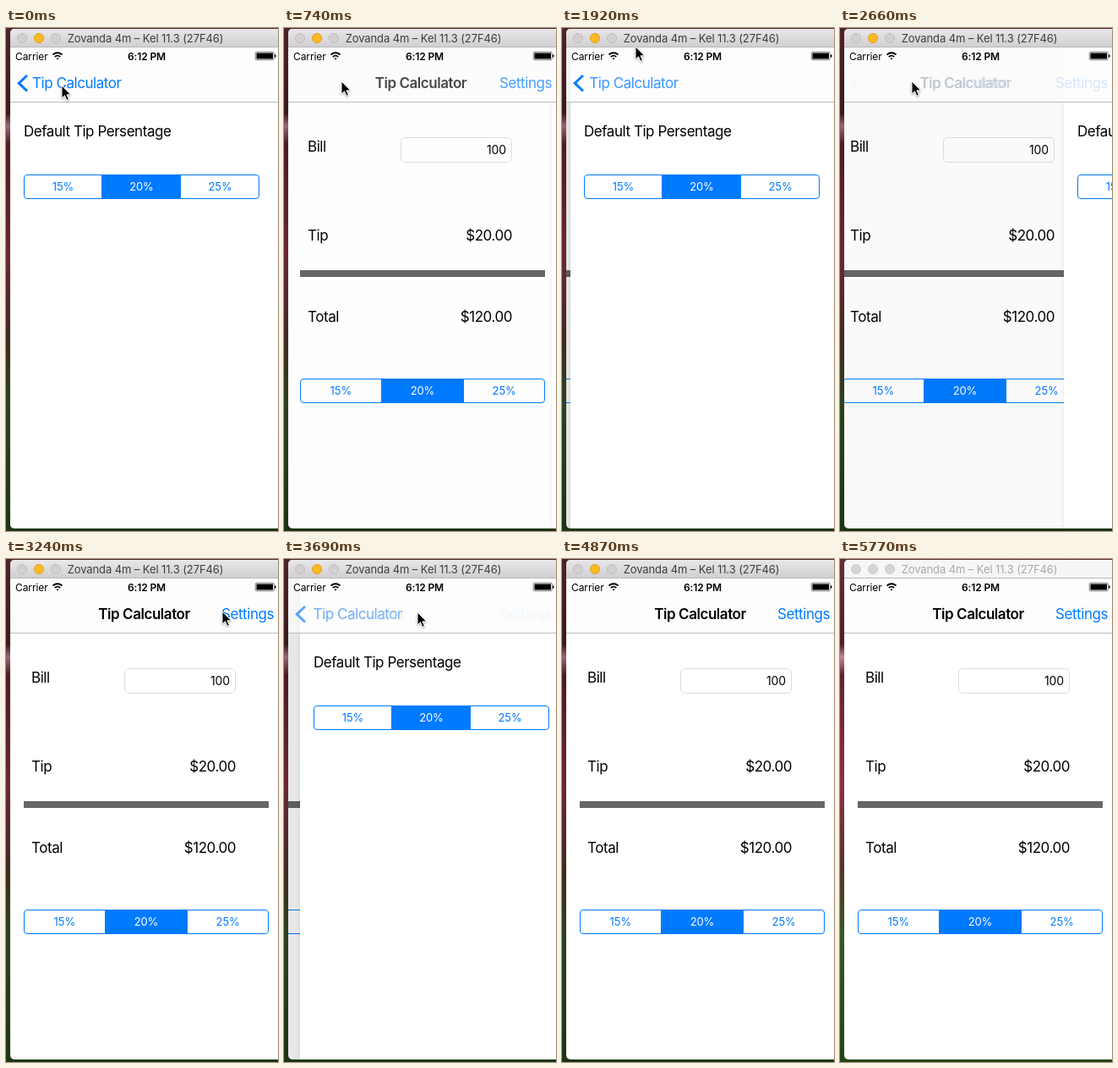
Write an HTML page that moves like this. It is 322x594 px and loops after 5870 ms.

```html
<!DOCTYPE html>
<html lang="en">
<head>
<meta charset="utf-8">
<title>Tip Calculator</title>
<style>
  html, body { margin: 0; width: 100%; height: 100%; overflow: hidden; }
  svg { display: block; width: 100vw; height: 100vh; }
  text { font: 17px Inter, "Liberation Sans", sans-serif; letter-spacing: -.45px; white-space: pre; }
  .small { font-size: 13px; letter-spacing: -.1px; }
  .field { font-size: 14px; letter-spacing: -.1px; }
  .status { font-size: 12px; letter-spacing: -.1px; }
  .bold { font-weight: 600; }
  .mid { text-anchor: middle; }
  .end { text-anchor: end; }
  .blue { fill: #007aff; }
  .sheet { filter: drop-shadow(-1px 0 2px rgba(0, 0, 0, .06)); }
  #cursor { filter: drop-shadow(0 1px 1px rgba(0, 0, 0, .35)); }
  #lights circle { fill: #d2d0d2; stroke: #bdbbbd; }
  #lights .amber { fill: #fdb924; stroke: #e09e1a; }
  #caption { fill: #3e3c3e; }
  #bar { fill: url(#chrome); }
  .idle #bar { fill: #f6f6f6; }
  .idle #caption { fill: #a9a9a9; }
  .idle #lights circle { fill: #d5d5d5; stroke: #c8c8c8; }
  .idle #shade { opacity: .05; }
</style>
</head>
<body>
<svg id="stage" viewBox="0 0 322 594" preserveAspectRatio="none">
  <defs>
    <linearGradient id="wall" x2="0" y2="1">
      <stop offset="0" stop-color="#6a303a"/>
      <stop offset=".17" stop-color="#54222a"/>
      <stop offset=".195" stop-color="#d08ca4"/>
      <stop offset=".23" stop-color="#6c2432"/>
      <stop offset=".45" stop-color="#94344a"/>
      <stop offset=".62" stop-color="#5a3a2c"/>
      <stop offset=".75" stop-color="#3c5c28"/>
      <stop offset="1" stop-color="#264818"/>
    </linearGradient>
    <linearGradient id="chrome" x2="0" y2="1">
      <stop offset="0" stop-color="#e9e7e9"/>
      <stop offset="1" stop-color="#d1cfd1"/>
    </linearGradient>
    <clipPath id="frame"><rect x="5" y="1" width="330" height="590" rx="5"/></clipPath>
  </defs>

  <rect width="322" height="594" fill="url(#wall)"/>
  <rect id="shade" width="322" height="594" opacity=".27"/>

  <g clip-path="url(#frame)">
    <rect x="5" y="1" width="320" height="590" fill="#fff"/>

    <g id="home">
      <text x="30" y="146">Bill</text>
      <rect x="140.5" y="129.5" width="131" height="29" rx="4.5" fill="#fff" stroke="#dedede"/>
      <text class="field end" x="265" y="149">100</text>
      <text x="30" y="251">Tip</text>
      <text class="end" x="272" y="251">$20.00</text>
      <rect x="21" y="286" width="290" height="8" fill="#666"/>
      <text x="30" y="347">Total</text>
      <text class="end" x="272" y="347">$120.00</text>
      <g class="segments" data-y="414" data-width="290"></g>
    </g>
    <rect id="dim" x="5" y="23" width="320" height="568"/>

    <g id="settings">
      <rect class="sheet" x="5" y="23" width="322" height="568" fill="#fff"/>
      <text x="21" y="128">Default Tip Persentage</text>
      <g class="segments" data-y="173" data-width="279"></g>
    </g>

    <rect x="5" y="23" width="320" height="64" fill="#fdfdfd" opacity=".7"/>
    <rect x="5" y="87" width="320" height="1" fill="#bcbcbc"/>
    <path id="chevron" d="M25 56 15.200 65.200 25 74.500" fill="none" stroke="#007aff" stroke-width="3"/>
    <text id="backLabel" class="blue" y="71">Tip Calculator</text>
    <g id="front">
      <text id="title" class="bold" y="71">Tip Calculator</text>
      <text class="blue end" x="317" y="71">Settings</text>
    </g>

    <text class="status" x="11" y="37.500">Carrier</text>
    <g fill="none" stroke="#000" stroke-width="1.700">
      <path d="M55.500 31.500q5.500-4.500 11 0M57.700 34q3.300-2.700 6.600 0"/>
      <path d="M59.300 35.500h3.400L61 37.500z" fill="#000" stroke="none"/>
    </g>
    <text class="status bold mid" x="166.500" y="37.500">6:12 PM</text>
    <rect x="295.250" y="28.250" width="22" height="9.500" rx="1.500" fill="none" stroke="#000" stroke-width=".5"/>
    <path d="M296.500 29.500h19.500v7h-19.500zM318 31.500h1.500v3H318z"/>

    <rect id="bar" x="5" y="1" width="320" height="21"/>
    <rect x="5" y="22" width="320" height="1" fill="#bab8ba"/>
    <g id="lights">
      <circle cx="19" cy="12" r="5.500"/>
      <circle class="amber" cx="39" cy="12" r="5.500"/>
      <circle cx="59" cy="12" r="5.500"/>
    </g>
    <text id="caption" class="small mid" x="165" y="16.500">Zovanda 4m – Kel 11.3 (27F46)</text>
  </g>

  <path id="cursor" d="M0 0v15l3.500-3.300 2.400 5.600 2.500-1.100-2.400-5.400h4.800z" stroke="#fff"/>
</svg>
<script>
const LOOP = 5870, STEP = 147.5;
const CURSOR_GONE = 4720, IDLE_FROM = 5770;
const SLIDES = [
  { start: -2000, opens: true },
  { start: 415, opens: false },
  { start: 1577, opens: true },
  { start: 2484, opens: false },
  { start: 3416, opens: true },
  { start: 4268, opens: false },
];
const BACK = [68, 63], SETTINGS = [286, 62];
const TRIPS = [
  { start: 0, end: 147, from: [66, 68], to: BACK },
  { start: 740, end: 1340, from: BACK, to: SETTINGS },
  { start: 1590, end: 1910, from: SETTINGS, to: [87, 22] },
  { start: 1920, end: 2500, from: [87, 22], to: [85, 63] },
  { start: 2660, end: 3240, from: [85, 63], to: SETTINGS },
  { start: 3420, end: 3900, from: SETTINGS, to: BACK },
];

const $ = id => document.getElementById(id);
const lerp = (a, b, k) => a + (b - a) * k;
const clamp = v => Math.min(1, Math.max(0, v));
const smooth = k => k * k * (3 - 2 * k);
const current = (list, t) => list.filter(item => item.start <= t).pop();
const set = (id, name, value) => $(id).setAttribute(name, value);
const shift = (id, x, y = 0) => set(id, 'transform', `translate(${Math.round(x)} ${Math.round(y)})`);

for (const group of document.querySelectorAll('.segments')) {
  const x = 21, y = +group.dataset.y, width = +group.dataset.width;
  const part = width / 3, first = Math.round(x + part);
  group.innerHTML =
    `<rect x="${x + .5}" y="${y + .5}" width="${width - 1}" height="28" rx="3.5" fill="#fff" stroke="#007aff"/>` +
    `<rect class="blue" x="${first - 1}" y="${y}" width="${Math.round(part) + 1}" height="29"/>` +
    ['15%', '20%', '25%'].map((label, i) =>
      `<text class="small mid" x="${x + part * (i + .5)}" y="${y + 19}" fill="${i === 1 ? '#fff' : '#007aff'}">${label}</text>`
    ).join('');
}

function drawScreens(t) {
  const { start, opens } = current(SLIDES, t);
  const age = (t - start) / 1000;
  const spring = 18 * age;
  const left = age > .46 ? 0 : (1 + spring) * Math.exp(-spring);
  const open = opens ? 1 - left : left;

  shift('home', -96 * open);
  shift('settings', 320 * (1 - open));
  set('dim', 'opacity', .1 * open);

  const fadeIn = clamp((age - .13) / .27);
  const fadeOut = age > .3 ? 0 : Math.exp(-11.5 * age);
  set('chevron', 'opacity', opens ? clamp(fadeIn * 1.25) : fadeOut ** 2);
  set('backLabel', 'opacity', opens ? fadeIn : fadeOut);
  set('front', 'opacity', opens ? fadeOut : fadeIn);
  for (const id of ['title', 'backLabel']) set(id, 'x', lerp(109.3, 31, open));
}

function drawCursor(t) {
  const { start, end, from, to } = current(TRIPS, t);
  const k = smooth(clamp((t - start) / (end - start)));
  shift('cursor', lerp(from[0], to[0], k), lerp(from[1], to[1], k));
  $('cursor').style.display = t >= CURSOR_GONE ? 'none' : '';
}

const begin = performance.now();
function frame() {
  const time = (performance.now() - begin) % LOOP;
  const t = Math.floor(time / STEP) * STEP;
  drawScreens(t);
  drawCursor(t);
  $('stage').classList.toggle('idle', time >= IDLE_FROM);
  requestAnimationFrame(frame);
}
frame();
</script>
</body>
</html>
```
